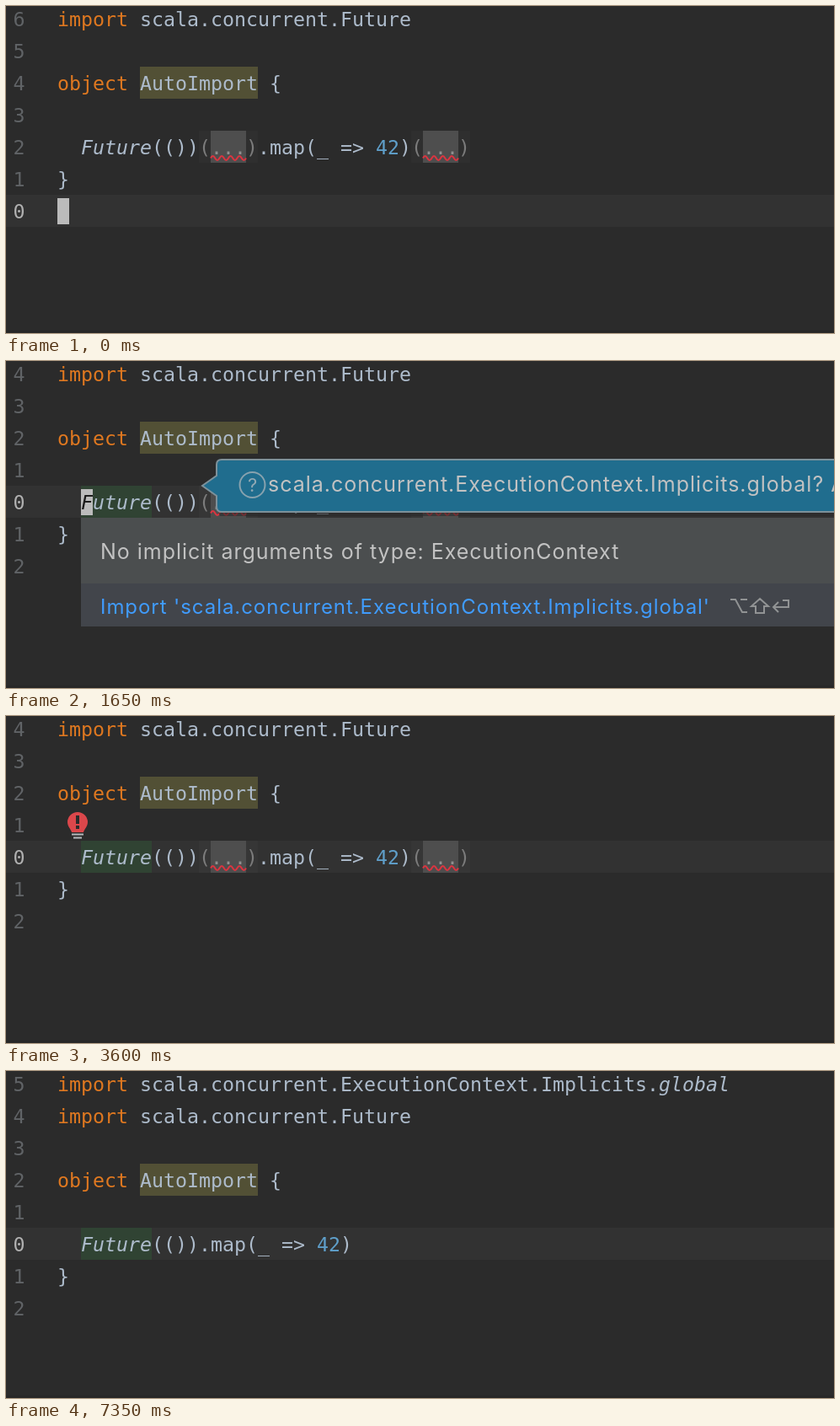
Write an HTML page that moves like this. It is 983 px wide and 388 px high and loops after 7450 ms.

```html
<!DOCTYPE html>
<html lang="en">
<head>
<meta charset="utf-8">
<title>Auto import</title>
<style>
  html, body { margin: 0; width: 100%; height: 100%; overflow: hidden; background: #2b2b2b; }
  svg { display: block; width: 983px; height: 388px; }
  text { white-space: pre; }

  .code { font: 23.25px "DejaVu Sans Mono", monospace; fill: #adbbcb; font-variant-ligatures: none; }
  .kw { fill: #df7820; }
  .num { fill: #5f9fca; }
  .it { font-style: italic; }
  .gutter { fill: #606366; }
  .now { fill: #b0b0b0; }
  .row { fill: #323232; }
  .block { fill: #bbb; }

  .ui { font: 25px Inter, "Open Sans", sans-serif; font-optical-sizing: none; letter-spacing: .039em; fill: #c2c2c2; }
  .link { font-size: 24px; fill: #409cff; }
  .hint { font-size: 23px; fill: #808283; }
  .line { fill: none; stroke-width: 2; }

  /* One timeline of 7450 ms with hard cuts. */
  .t { animation: 7450ms step-end infinite; }
  .start { animation-name: start; }
  .moved { animation-name: moved; }
  .body { animation-name: body; }
  .added { animation-name: added; }
  .plain { animation-name: plain; }
  .slant { animation-name: slant; }
  .usage { animation-name: usage; }
  .inlays { animation-name: inlays; }
  .tail { animation-name: tail; }
  .caret { animation-name: caret; }
  .popup { animation-name: popup; }
  .bubble { animation-name: bubble; }
  .bulb { animation-name: bulb; }
  .menu { animation-name: menu; }

  @keyframes start { 0% { visibility: visible } 2.013%, 100% { visibility: hidden } }
  @keyframes moved { 0% { visibility: hidden } 2.013%, 100% { visibility: visible } }
  @keyframes body { 0% { transform: none } 50.335%, 100% { transform: translateY(38px) } }
  @keyframes added { 0% { visibility: hidden } 50.335%, 100% { visibility: visible } }
  @keyframes plain { 0%, 54.362%, 100% { visibility: hidden } 50.335% { visibility: visible } }
  @keyframes slant { 0% { visibility: hidden } 54.362%, 100% { visibility: visible } }
  @keyframes usage { 0% { visibility: hidden } 6.04%, 100% { visibility: visible } }
  @keyframes inlays { 0% { visibility: visible } 56.375%, 100% { visibility: hidden } }
  @keyframes tail { 0% { transform: none } 56.375%, 100% { transform: translateX(-70px) } }
  @keyframes caret {
    0%, 16.107%, 28.187%, 62.416%, 76.51%, 90.603%, 98.657%, 100% { visibility: hidden }
    2.013%, 22.147%, 50.335%, 70.469%, 82.55%, 96.644% { visibility: visible }
  }
  @keyframes popup { 0%, 24.161%, 100% { visibility: hidden } 2.013% { visibility: visible } }
  @keyframes bubble { 0%, 24.161%, 100% { visibility: hidden } 14.093% { visibility: visible } }
  @keyframes bulb { 0%, 50.335%, 100% { visibility: hidden } 28.187% { visibility: visible } }
  @keyframes menu { 0%, 48.322%, 100% { visibility: hidden } 28.187% { visibility: visible } }
</style>
</head>
<body>
<svg viewBox="0 0 983 388">
  <defs>
    <g id="inlay">
      <rect width="70" height="38" fill="#fff" fill-opacity=".025"/>
      <rect x="14" width="42" height="38" fill="#4e4e4e"/>
      <text class="code" y="28" style="fill:#7c7c7c">(<tspan fill="#8e8e8e">...</tspan>)</text>
      <path class="line" stroke="#dc3440" d="M14 32.5q2.6-5 5.25 0t5.25 0 5.25 0 5.25 0 5.25 0 5.25 0 5.25 0 5.25 0"/>
    </g>
    <g id="alert">
      <path fill="#db474b" d="M12 0a12 12 0 0 1 12 12c0 5-4 8-5 12H5c-1-4-5-7-5-12A12 12 0 0 1 12 0z"/>
      <path fill="#2b2b2b" d="M10 4h4v10h-4zM10 16h4v4h-4z"/>
      <path class="line" stroke="#b4b8bb" d="M5 26.5h14M7 30.5h10"/>
    </g>
    <path id="option" class="line" d="M0 1h6l8 15h6M12 1h8"/>
  </defs>

  <rect width="983" height="388" fill="#2b2b2b"/>
  <rect y="385" width="983" height="3" fill="#272727"/>

  <g class="t start">
    <rect class="row" y="224" width="983" height="38"/>
    <rect class="block" x="61" y="228" width="14" height="31"/>
    <g class="code gutter">
      <text x="8.5" y="24">6</text>
      <text x="8.5" y="62">5</text>
      <text x="8.5" y="100">4</text>
      <text x="8.5" y="138">3</text>
      <text x="8.5" y="176">2</text>
      <text x="8.5" y="214">1</text>
      <text x="8.5" y="252" class="now">0</text>
    </g>
  </g>

  <g class="t added code">
    <text x="8.5" y="24" class="gutter">5</text>
    <text x="61" y="24"><tspan class="kw">import</tspan> scala.concurrent.ExecutionContext.Implicits.</text>
  </g>
  <text class="t plain code" x="775" y="24">global</text>
  <text class="t slant code it" x="775" y="24">global</text>

  <g class="t body">
    <g class="t moved">
      <rect class="row" y="148" width="983" height="38"/>
      <g class="code gutter">
        <text x="8.5" y="24">4</text>
        <text x="8.5" y="62">3</text>
        <text x="8.5" y="100">2</text>
        <text x="8.5" y="138">1</text>
        <text x="8.5" y="176" class="now">0</text>
        <text x="8.5" y="214">1</text>
        <text x="8.5" y="252">2</text>
      </g>
    </g>
    <rect x="159" y="72" width="140" height="38" fill="#525035"/>
    <rect class="t usage" x="89" y="148" width="84" height="38" fill="#304333"/>
    <g class="code">
      <text x="61" y="24"><tspan class="kw">import</tspan> scala.concurrent.Future</text>
      <text x="61" y="100"><tspan class="kw">object</tspan> AutoImport {</text>
      <text x="89" y="176"><tspan class="it">Future</tspan>(())</text>
      <text x="299" y="176" class="t tail">.map(_ =&gt; <tspan class="num">42</tspan>)</text>
      <text x="61" y="214">}</text>
    </g>
    <g class="t inlays">
      <use href="#inlay" x="229" y="148"/>
      <use href="#inlay" x="481" y="148"/>
    </g>
    <g class="t caret">
      <rect class="block" x="89" y="152" width="14" height="31"/>
      <text class="code it" x="89" y="176" style="fill:#191919">F</text>
    </g>
    <use class="t bulb" href="#alert" x="73" y="114"/>
  </g>

  <g class="t popup">
    <rect x="89" y="186" width="900" height="129" fill="#4b4e4f"/>
    <rect x="89" y="264" width="900" height="51" fill="#42454b"/>
    <text class="ui" x="112" y="235">No implicit arguments of type: ExecutionContext</text>
    <text class="ui link" x="112" y="300">Import 'scala.concurrent.ExecutionContext.Implicits.global'</text>
    <g stroke="#919394">
      <use href="#option" x="860" y="282"/>
      <path class="line" d="M895 282l10 9h-5v8h-10v-8h-5zM922 284h7v8h-18m6-6l-6 6 6 6"/>
    </g>
  </g>

  <g class="t bubble">
    <path fill="#2b2b2b" fill-opacity=".6" d="M252 180h731v4H254z"/>
    <path fill="#206d8e" stroke="#7d919a" stroke-width="2" d="M990 117H256q-6 0-6 6v13l-17 12 17 12v13q0 6 6 6h734z"/>
    <circle class="line" cx="292.5" cy="147" r="15" stroke="#87a2ae"/>
    <text class="ui" x="292.5" y="155" text-anchor="middle" style="font-size:22px;letter-spacing:0;fill:#91a9b4">?</text>
    <text class="ui" x="311" y="155">scala.concurrent.ExecutionContext.Implicits.global? A</text>
  </g>

  <g class="t menu">
    <rect x="89" y="187" width="829" height="122" fill="#3c3f41"/>
    <rect x="89" y="188" width="829" height="42" fill="#1a65d6"/>
    <rect x="89" y="277" width="829" height="32" fill="#464a4b"/>
    <use href="#alert" x="111" y="192"/>
    <text class="ui" x="145" y="218" style="fill:#fff">Import 'scala.concurrent.ExecutionContext.Implicits.global'</text>
    <path class="line" stroke="#afb1b3" d="M111 246h19M111 253h13M111 260h7"/>
    <path fill="#afb1b3" d="M133 245l5 5-13 13-6 2 1-7z"/>
    <text class="ui" x="146" y="263">Add method contract to 'apply'</text>
    <path fill="#a9abac" d="M881 246l14 8.5-14 8.5z"/>
    <text class="ui hint" x="94" y="302">Press</text>
    <use href="#option" x="168" y="285" stroke="#808283"/>
    <text class="ui hint" x="189" y="302">Space to open preview</text>
  </g>
</svg>
</body>
</html>
```
